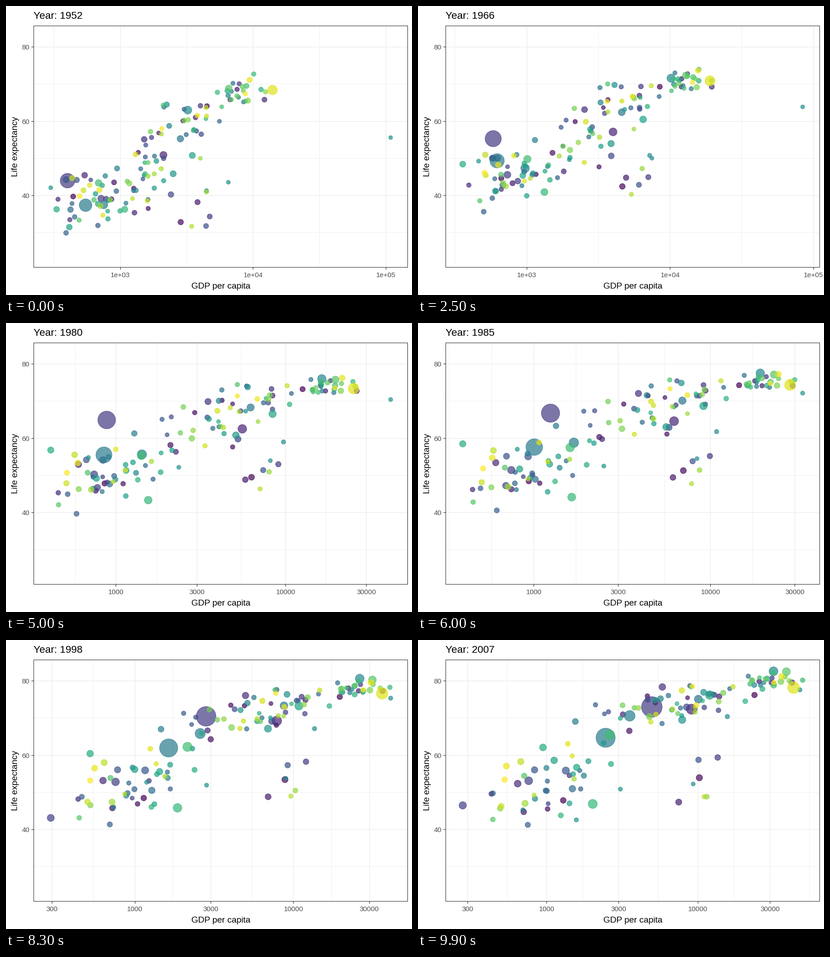
Recreate the animation shown at these times as a matplotlib script. Size 885 by 632 pixels, loop 10 s.

```python
import numpy as np
import matplotlib.pyplot as plt
from matplotlib.animation import FuncAnimation
from matplotlib.collections import LineCollection
from matplotlib.patches import Rectangle

W, H, DPI = 885, 632, 100
PX = 72 / DPI                       # points per pixel
LEFT, RIGHT, TOP, BOTTOM = 60.5, 875.5, 43.5, 571.5
FRAMES, COUNT = 100, 142
START, END = 1952, 2007
MAJOR_Y, MINOR_Y = (40, 60, 80), (30, 50, 70)

plt.rcParams["font.family"] = "Liberation Sans"
rng = np.random.default_rng(11)
years = np.linspace(START, END, FRAMES)
t = np.linspace(0, 1, FRAMES)

bubbles = {}                        # colour rank -> (log gdp, life, diameter)


def mix(a, b, p):
    return a + (b - a) * p


def diameter(pop):
    return 9 + 37 * np.sqrt(pop / 1319)


def add(rank, pops, log_gdp, life):
    bubbles[rank] = log_gdp, life, mix(*diameter(np.array(pops)), t)


def keyed(rank, pops, *points):
    """Straight moves between a few (year, gdp, life) points."""
    when, gdp, life = np.array(points, float).T
    add(rank, pops, np.interp(years, when, np.log10(gdp)),
        np.interp(years, when, life))


def eased(rank, pops, first, last, gdp_power, life_power):
    """One eased move from first to last (gdp, life)."""
    add(rank, pops, mix(*np.log10([first[0], last[0]]), t ** gdp_power),
        mix(first[1], last[1], t ** life_power))


# the largest bubbles
keyed(24, (556, 1319), (1952, 400, 44), (1957, 576, 50.5), (1962, 488, 44.5),
      (1967, 613, 58.4), (1977, 741, 64), (1987, 1379, 67.3),
      (2007, 4959, 73))
eased(58, (372, 1110), (547, 37.4), (2452, 64.7), 1.8, .6)
eased(134, (158, 301), (13990, 68.4), (42952, 78.2), .95, 1)
eased(59, (82, 224), (750, 37.5), (3541, 70.6), 1.3, .88)
eased(14, (57, 190), (2109, 50.9), (9066, 72.4), .6, .9)
eased(66, (86, 127), (3217, 63), (31656, 82.6), .5, .6)
eased(94, (33, 135), (1077, 36.3), (2014, 46.9), .8, .6)
eased(97, (41, 169), (685, 43.4), (2606, 65.5), .9, .9)
eased(82, (30, 109), (3478, 50.8), (11978, 76.2), .5, .7)

# bubbles that set the ends of the x axis
keyed(71, (.2, 2.5), (1952, 108382, 55.6), (1957, 113523, 58),
      (1967, 80895, 64.6), (1972, 109348, 67.7), (1977, 59265, 69.3),
      (1982, 31354, 71.3), (2007, 47307, 77.6))
keyed(95, (3.3, 4.6), (1952, 10095, 72.7), (1987, 31541, 75.9),
      (2007, 49357, 80.2))
keyed(87, (20, 48), (1952, 331, 36.3), (1962, 388, 45.1), (1967, 349, 49.4),
      (1982, 424, 58.1), (1992, 347, 59.3), (2007, 944, 62.1))
keyed(27, (14, 65), (1952, 781, 39.1), (1972, 905, 46), (1987, 673, 47.4),
      (1997, 312, 42.6), (2002, 241, 45), (2007, 278, 46.5))
keyed(73, (.7, 2), (1952, 299, 42.1), (1962, 412, 47.7), (1992, 977, 59.7),
      (2007, 1569, 42.6))
keyed(17, (2.4, 8.4), (1952, 339, 39), (1962, 355, 42), (1972, 464, 44.1),
      (2007, 430, 49.6))

# the crowd: count, first and last (gdp, life), spreads, mid-period life gain
CROWD = [
    (24, (8000, 68), (30000, 79.8), (.12, .1), (2.2, 1.1), 0),
    (24, (3300, 60), (10500, 75), (.18, .18), (4, 2.4), 3),
    (30, (1700, 47), (5000, 71), (.22, .23), (6, 3.4), 3),
    (7, (4000, 37), (11000, 56), (.2, .2), (5, 7), 6),
    (COUNT, (750, 39.5), (1050, 53), (.2, .24), (4.2, 6.3), 4),
]
free = list(rng.permutation([r for r in range(COUNT) if r not in bubbles]))
for n, (g0, l0), (g1, l1), (sg0, sg1), (sl0, sl1), gain in CROWD:
    for _ in range(min(n, len(free))):
        a, b, c, d = np.clip(rng.normal(size=4), -1.9, 1.9)
        x0 = max(np.log10(g0) + sg0 * a, np.log10(390))
        x1 = np.clip(np.log10(g1) + sg1 * (.6 * a + .8 * b),
                     np.log10(440), np.log10(42000))
        y0 = l0 + sl0 * (.4 * a + .9 * c)
        y1 = l1 + sl1 * (.4 * b + .3 * c + .8 * d)
        pop = 10 ** np.clip(rng.normal(.75, .5), -.5, 1.75)
        add(free.pop(), (pop * .7, pop * 1.5), mix(x0, x1, t ** .7),
            mix(y0, y1, t) + gain * np.sin(np.pi * t))

ranks = sorted(bubbles)
gdp, life, size = (np.array([bubbles[r][k] for r in ranks]) for k in range(3))
colors = plt.get_cmap("viridis")(np.array(ranks) / (COUNT - 1))
colors[:, 3] = .7


def y_px(v):
    return 414.5 - (v - 40) * 8.125


def crisp(v):
    return np.floor(v) + .5


fig = plt.figure(figsize=(W / DPI, H / DPI), dpi=DPI, facecolor="white")
ax = fig.add_axes([0, 0, 1, 1])
ax.set(xlim=(0, W), ylim=(H, 0))
ax.axis("off")


def lines(color, width, z):
    art = LineCollection([], colors=color, linewidths=width * PX, zorder=z,
                         snap=False)
    ax.add_collection(art, autolim=False)
    return art


def label(x, y, s, px, color="black", **kw):
    return ax.text(x, y, s, fontsize=px * PX, color=color, va="baseline", **kw)


minor = lines("#EBEBEB", .7, 1)
major = lines("#EBEBEB", 1.3, 1.1)
ticks = lines("#333333", 1.2, 4)
dots = ax.scatter(gdp[:, 0], life[:, 0], facecolors=colors, edgecolors=colors,
                  linewidths=1.1 * PX, zorder=2)
ax.add_patch(Rectangle((LEFT, TOP), RIGHT - LEFT, BOTTOM - TOP, fill=False,
                       ec="#333333", lw=1.1 * PX, zorder=3, snap=False))

title = label(60, 28, "", 22.3)
label((LEFT + RIGHT) / 2, 618, "GDP per capita", 19, ha="center")
label(25, 307, "Life expectancy", 19, ha="center", rotation=90,
      rotation_mode="anchor")
for v in MAJOR_Y:
    label(51.5, y_px(v) + 5.5, str(v), 15, "#4D4D4D", ha="right")
x_labels = [label(0, 593, "", 15, "#4D4D4D", ha="center") for _ in range(6)]


def across(v, x0=LEFT, x1=RIGHT):
    y = crisp(y_px(v))
    return [(x0, y), (x1, y)]


def down(x, y0=TOP, y1=BOTTOM):
    x = crisp(x)
    return [(x, y0), (x, y1)]


def x_breaks(lo, hi):
    """Major values and minor positions for a log axis from lo to hi."""
    heads = (1,) if hi >= 5 else (1, 3)
    values = [m * 10 ** k for k in range(2, 6) for m in heads]
    values = [v for v in values if lo <= np.log10(v) <= hi]
    main = np.log10(values)
    step = main[1] - main[0]
    ext = np.r_[main[0] - step, main, main[-1] + step]
    between = np.r_[ext[0], (ext[1:] + ext[:-1]) / 2, ext[-1]]
    return values, main, between[(between > lo) & (between < hi)]


def update(i):
    x = gdp[:, i]
    pad = .05 * np.ptp(x)
    lo, hi = x.min() - pad, x.max() + pad

    def x_px(v):
        return mix(LEFT, RIGHT, (v - lo) / (hi - lo))

    values, main, between = x_breaks(lo, hi)
    main = x_px(main)
    major.set_segments([across(v) for v in MAJOR_Y] + [down(p) for p in main])
    minor.set_segments([across(v) for v in MINOR_Y]
                       + [down(p) for p in x_px(between)])
    ticks.set_segments([across(v, LEFT - 5, LEFT) for v in MAJOR_Y]
                       + [down(p, BOTTOM, BOTTOM + 5) for p in main])
    for k, text in enumerate(x_labels):
        shown = k < len(values)
        text.set_visible(shown)
        if shown:
            text.set_x(main[k])
            text.set_text(f"{values[k]:.0e}" if hi >= 5 else str(values[k]))

    dots.set_offsets(np.c_[x_px(x), y_px(life[:, i])])
    dots.set_sizes(((size[:, i] - 1) * PX) ** 2)
    title.set_text(f"Year: {round(years[i])}")
    return dots, major, minor, ticks, title, *x_labels


anim = FuncAnimation(fig, update, frames=FRAMES, interval=100, repeat=True,
                     repeat_delay=0, blit=False)
plt.show()
```
